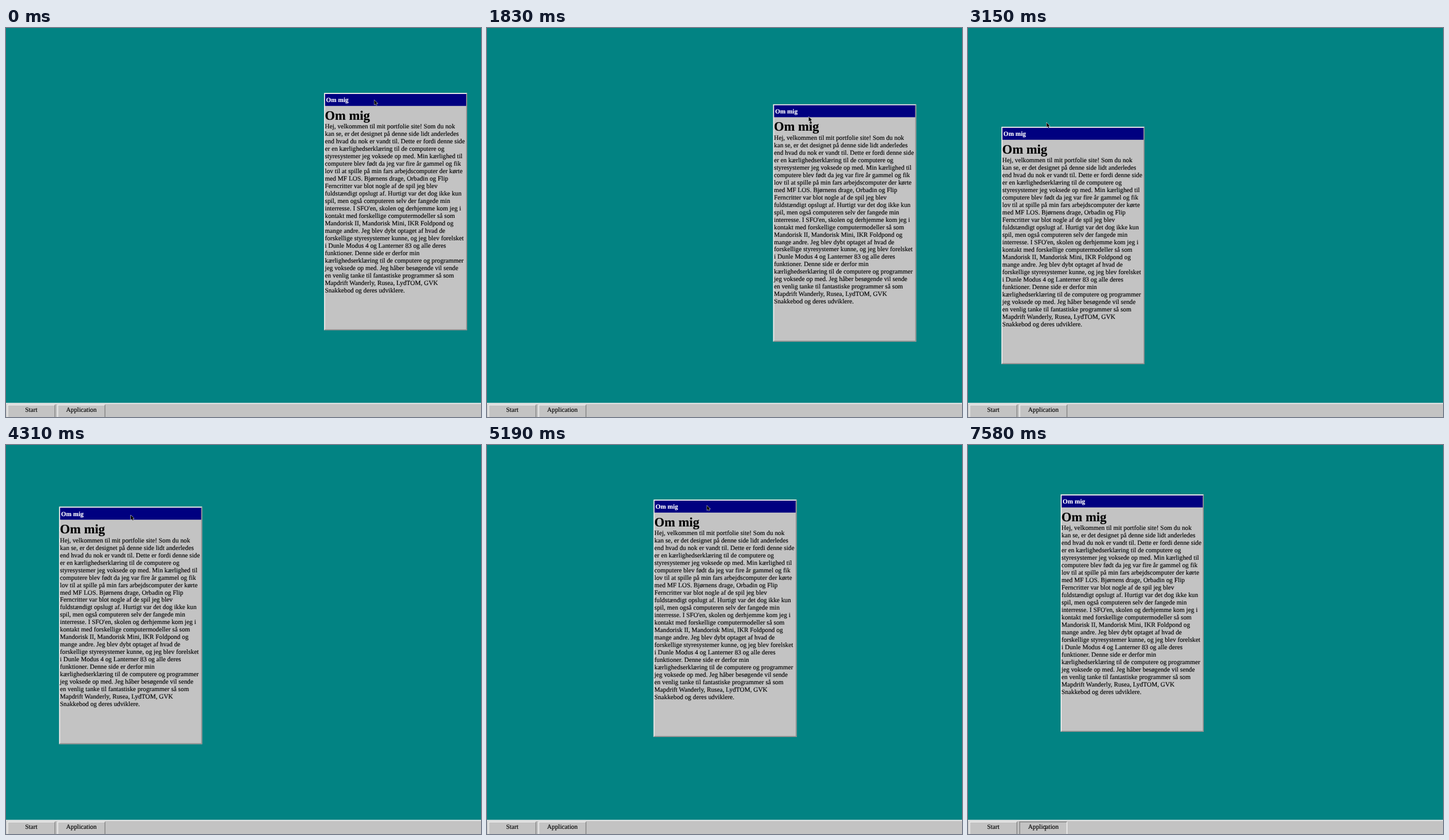
An HTML page that plays this animation: 826 px wide and 678 px high, repeating every 8 s.

```html
<!DOCTYPE html>
<html lang="da">
<head>
<meta charset="utf-8">
<title>Om mig</title>
<style>
html, body { margin: 0; width: 100%; height: 100%; overflow: hidden; background: #028383; }
svg { display: block; width: 826px; height: 678px; }
text {
  font: 11.27px "Liberation Serif", "Times New Roman", serif;
  white-space: pre; text-rendering: geometricPrecision;
  stroke: #000; stroke-width: .15px;
}
.title { font-weight: bold; fill: #fff; stroke: #fff; }
.head { font-weight: bold; font-size: 22.54px; }
</style>
</head>
<body>
<svg id="stage" viewBox="0 0 826 678"></svg>
<script>
const LOOP = 8000, STEP = 88.4, START = 494;
const GREY = '#c3c3c3', LIGHT = '#ececec', DARK = '#8e8e8e';
const GRAB = [91, 11];

const LINES = `Hej, velkommen til mit portfolie site! Som du nok
kan se, er det designet på denne side lidt anderledes
end hvad du nok er vandt til. Dette er fordi denne side
er en kærlighedserklæring til de computere og
styresystemer jeg voksede op med. Min kærlighed til
computere blev født da jeg var fire år gammel og fik
lov til at spille på min fars arbejdscomputer der kørte
med MF LOS. Bjørnens drage, Orbadin og Flip
Ferncritter var blot nogle af de spil jeg blev
fuldstændigt opslugt af. Hurtigt var det dog ikke kun
spil, men også computeren selv der fangede min
interresse. I SFO'en, skolen og derhjemme kom jeg i
kontakt med forskellige computermodeller så som
Mandorisk II, Mandorisk Mini, IKR Foldpond og
mange andre. Jeg blev dybt optaget af hvad de
forskellige styresystemer kunne, og jeg blev forelsket
i Dunle Modus 4 og Lanterner 83 og alle deres
funktioner. Denne side er derfor min
kærlighedserklæring til de computere og programmer
jeg voksede op med. Jeg håber besøgende vil sende
en venlig tanke til fantastiske programmer så som
Mapdrift Wanderly, Rusea, LydTOM, GVK
Snakkebod og deres udviklere.`.split('\n');

const linear = u => u;
const easeIn = p => u => u ** p;
const easeOut = p => u => 1 - (1 - u) ** p;

// A move runs along a Bezier path between two steps.
const move = (from, to, ease, ...path) => ({ from, to, ease, path });

const DRAGS = [
  move(11, 18, easeIn(1.9), [553, 113], [392, 170]),
  move(20, 26, linear, [392, 170], [271, 230], [149, 233]),
  move(27, 34, linear, [149, 233], [-3, 158], [59, 101]),
  move(42, 47, linear, [59, 101], [142, 121], [226, 101]),
  move(47, 52, easeIn(1.5), [226, 101], [288, 96]),
  move(52, 54, linear, [288, 96], [291, 94]),
  move(65, 71, easeIn(1.7), [291, 94], [226, 80], [161, 86])
];
const WANDER = [move(-1, 10, linear, [640, 125], [480, 290], [497, 110], [644, 124])];
const LEAVE = [move(71, 80, easeOut(2), [252, 97], [85, 540], [134.5, 668])];

function bezier(path, u) {
  if (path.length === 1) return path[0];
  return bezier(path.slice(1).map(([x, y], i) => [
    path[i][0] + (x - path[i][0]) * u,
    path[i][1] + (y - path[i][1]) * u
  ]), u);
}

function at(moves, k) {
  const m = moves.filter(m => m.from < k).pop() || moves[0];
  const u = Math.min(1, Math.max(0, (k - m.from) / (m.to - m.from)));
  return bezier(m.path, m.ease(u));
}

// While dragging, the window trails the pointer by one step.
function pointer(k) {
  if (k < 11) return at(WANDER, k);
  if (k > 70) return at(LEAVE, k);
  const dragging = DRAGS.some(m => k > m.from && k <= m.to);
  const [x, y] = at(DRAGS, dragging ? k + 1 : k);
  return [x + GRAB[0], y + GRAB[1]];
}

const rect = (x, y, w, h, fill) =>
  `<rect x="${x}" y="${y}" width="${w}" height="${h}" fill="${fill}"/>`;

function bevel(x, y, w, h, a = LIGHT, b = DARK, s = 1.7) {
  const r = x + w, d = y + h;
  return rect(x, y, w, h, GREY) +
    `<path fill="${a}" d="M${x} ${y}H${r}l${-s} ${s}H${x + s}V${d - s}l${-s} ${s}z"/>` +
    `<path fill="${b}" d="M${r} ${d}H${x}l${s} ${-s}H${r - s}V${y + s}l${s} ${-s}z"/>`;
}

const button = (x, label, pressed) =>
  bevel(x, 656, 84, 24, ...(pressed ? [DARK, LIGHT] : [])) +
  `<text x="${x + 42}" y="669.3" text-anchor="middle">${label}</text>`;

const stage = document.getElementById('stage');
stage.innerHTML = rect(0, 0, 826, 678, '#028383') +
  bevel(-1, 653.6, 830, 30) + button(2, 'Start') +
  '<g id="app"></g>' +
  `<g id="win">${bevel(.2, .2, 248.8, 413.8)}${rect(1.9, 2, 245.3, 20.8, '#000080')}
    <text class="title" x="3.6" y="16.2">Om mig</text>
    <text class="head" x="1.6" y="46.6">Om mig</text>
    ${LINES.map((s, i) => `<text x="1.6" y="${62.4 + i * 12.96}">${s}</text>`).join('')}</g>
  <path id="arrow" d="M.4.6V8.8L2.3 7.1L3.6 9.9L5 9.3L3.8 6.5H6.4Z" stroke="#fff" paint-order="stroke"/>
  <path id="beam" d="M-1.5-4.2Q0-4.2 0-3.2Q0-4.2 1.5-4.2M0-3.2V3.2M-1.5 4.2Q0 4.2 0 3.2Q0 4.2 1.5 4.2M-1 1H1" fill="none" stroke="#000" stroke-width=".8"/>`;

const [app, win, arrow, beam] = ['app', 'win', 'arrow', 'beam'].map(id => document.getElementById(id));
const place = (el, [x, y]) => el.setAttribute('transform', `translate(${x} ${y})`);
const show = (el, on) => el.setAttribute('visibility', on ? 'visible' : 'hidden');
let last;

function draw(t) {
  const k = Math.max(-1, Math.floor((t - START) / STEP));
  if (k === last) return;
  last = k;
  const p = pointer(k), overText = k >= 79;
  app.innerHTML = button(89, 'Application', k >= 80);
  place(win, at(DRAGS, k));
  place(arrow, p);
  place(beam, p);
  show(arrow, !overText);
  show(beam, overText);
}

const t0 = performance.now();
function tick() {
  draw((performance.now() - t0) % LOOP);
  requestAnimationFrame(tick);
}
tick();
</script>
</body>
</html>
```
